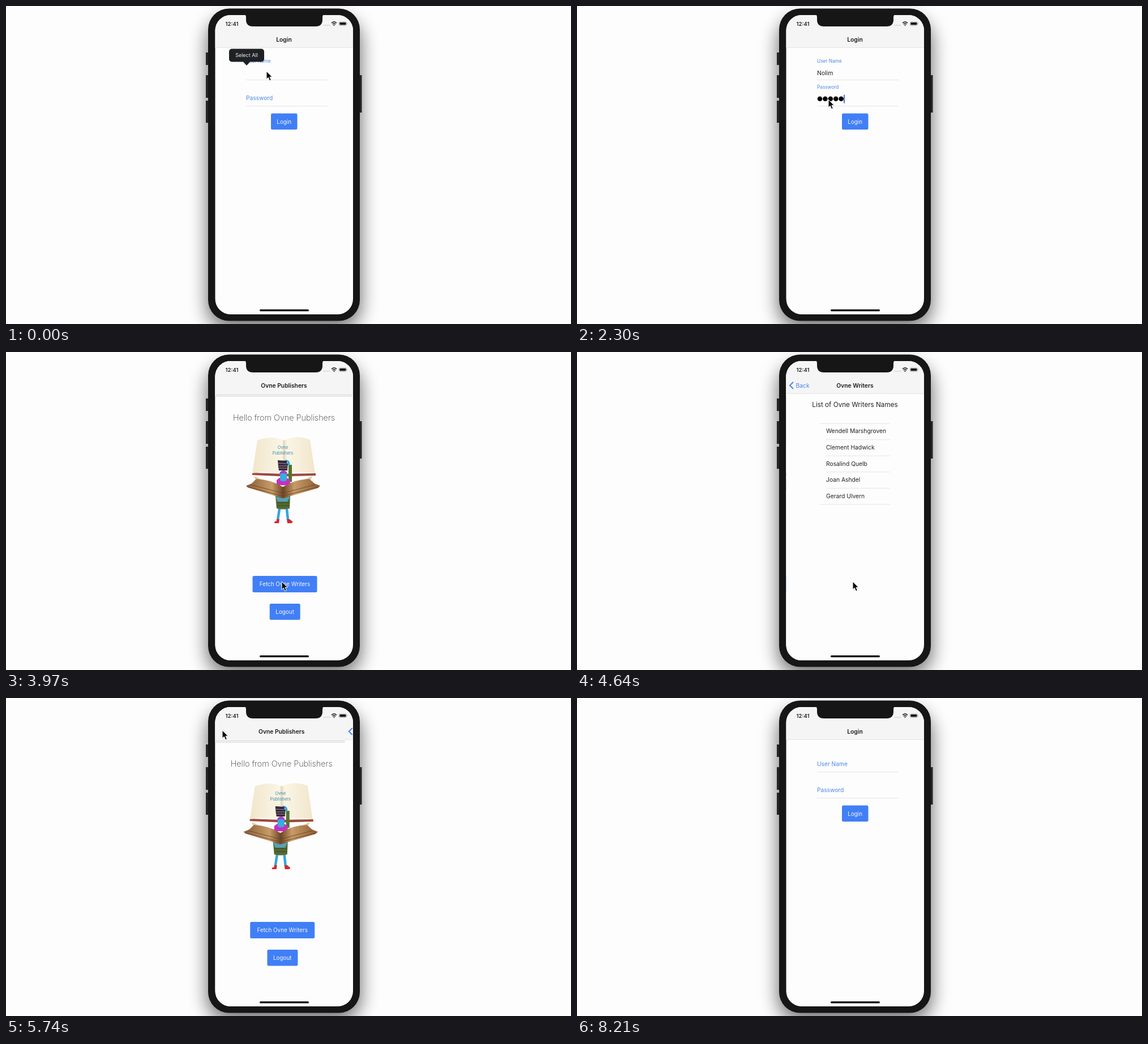
These frames come from a looping animation (998x561 px, 8.25 s). An HTML page:

```html
<!DOCTYPE html>
<html lang="en">
<head>
<meta charset="utf-8">
<title>Login flow</title>
<style>
  html, body { margin: 0; width: 100%; height: 100%; overflow: hidden; background: #fdfdfd; }
  svg { display: block; width: 998px; height: 561px; }
  text { font: 10.2px Inter, "Liberation Sans", sans-serif; fill: #222; }
  .mid { text-anchor: middle; }
  .title { font-weight: 600; font-size: 10.3px; text-anchor: middle; fill: #1c1c1e; }
  .blue { fill: #4a87ea; }
  .btn rect { fill: #417ff6; }
  .btn text { fill: #f4f8ff; font-size: 9.9px; text-anchor: middle; }
  .rule { stroke: #dedede; stroke-width: .8; fill: none; }
  .hello { font-weight: 200; font-size: 14.4px; fill: #333; }
  .cover { font-size: 7.4px; fill: #3f8cae; }
</style>
</head>
<body>
<svg viewBox="0 0 998 561">
  <defs>
    <clipPath id="screen"><rect x="369.5" y="16" width="243.5" height="528" rx="27"/></clipPath>
    <filter id="blur" x="-50%" y="-30%" width="200%" height="160%"><feGaussianBlur stdDeviation="16"/></filter>
    <linearGradient id="wood">
      <stop offset="0" stop-color="#8a5a33"/><stop offset=".35" stop-color="#c79c68"/>
      <stop offset=".5" stop-color="#6e4526"/><stop offset=".65" stop-color="#c79c68"/>
      <stop offset="1" stop-color="#8a5a33"/>
    </linearGradient>
    <linearGradient id="paper">
      <stop offset="0" stop-color="#f1e6cb"/><stop offset=".48" stop-color="#faf5e6"/>
      <stop offset=".5" stop-color="#e2d6b8"/><stop offset=".55" stop-color="#faf5e6"/>
      <stop offset="1" stop-color="#f1e6cb"/>
    </linearGradient>
  </defs>

  <rect x="355" y="22" width="272" height="548" rx="40" opacity=".55" filter="url(#blur)"/>
  <path fill="#252525" d="M353 82h5v22h-5zM353 122h5v40h-5zM353 167h5v39h-5zM624 122h4.5v66H624z"/>
  <rect x="357" y="4.5" width="268" height="551" rx="37" fill="#161616"/>

  <g clip-path="url(#screen)">
    <g id="login">
      <rect x="369" y="16" width="245" height="529" fill="#fdfdfd"/>
      <rect id="bar" x="369" y="16" width="245" height="57" fill="#f5f5f6"/>
      <path id="barLine" class="rule" d="M369 73.4H614"/>
      <text id="loginTitle" class="title" x="491" y="62.7">Login</text>
      <path class="rule" d="M424 130.4H568M424 176.6H568"/>
      <text id="userLabel" class="blue">User Name</text>
      <text id="passLabel" class="blue">Password</text>
      <text id="userText" x="424" y="121.6" style="font-size:10.5px"></text>
      <g id="dots"></g>
      <rect id="caret" width="1.8" height="15" fill="#4560c9"/>
      <g class="btn"><rect x="468" y="189.5" width="46.5" height="28.5" rx="2.5"/><text x="491.2" y="207.6">Login</text></g>
      <g id="tip">
        <path fill="#1f2124" d="M399 75.5h52a5 5 0 0 1 5 5v13a5 5 0 0 1-5 5h-20l-6 6.5-6-6.5h-20a5 5 0 0 1-5-5v-13a5 5 0 0 1 5-5z"/>
        <text class="mid" x="425" y="90.2" style="font-size:9px;fill:#f2f2f2">Select All</text>
      </g>
    </g>

    <g id="home">
      <rect x="369" y="16" width="245" height="529" fill="#fdfdfd"/>
      <rect x="369" y="16" width="245" height="62" fill="#f5f5f6"/>
      <path class="rule" style="stroke:#cfcfd1" d="M371 75.6H611M371 78.2H611"/>
      <text class="title" x="491" y="62.7">Ovne Publishers</text>
      <text class="mid hello" x="491" y="121">Hello from Ovne Publishers</text>
      <g id="art">
        <path fill="#9c4a3c" d="M435 213l56 2 56-1v4l-56 1.500-56-2.500z"/>
        <path fill="url(#paper)" d="M444 156Q470 146 491 156Q514 145 537 155L546 214Q515 208 491 215Q462 208 435 214z"/>
        <text class="mid cover" x="489" y="170.6">Ovne</text>
        <text class="mid cover" x="489" y="180.6">Publishers</text>
        <path fill="#50752f" d="M499 199h6v30h-6z"/>
        <path fill="none" stroke="#31a8dd" stroke-width="3.500" d="M493 192q7-1 7 8"/>
        <path fill="#35283a" d="M480 191l16 1v4l2 1-1 12h-15l-1-7z"/>
        <path stroke="#b9a6ad" stroke-width=".8" d="M481 196l15 1M482 201h15M482 205h15"/>
        <path fill="#dfc89d" d="M438 219l25 11-20-1zM541 219l-25 11 20-1z"/>
        <circle cx="490" cy="216" r="7" fill="#a63fc2"/>
        <path fill="#c72fbe" d="M478 226l5-4h13l6 4v9h-24z"/>
        <rect x="484" y="214" width="12" height="14" rx="4" fill="#34aede"/>
        <path fill="#546a34" d="M476 254h26l-1 22q-12 3-23 0z"/>
        <path fill="#55a1b5" d="M476 255l13 3 13-3-5 9h-17z"/>
        <path stroke="#36461f" d="M478 266h23M478 271h23"/>
        <path fill="url(#wood)" d="M424 236l10-4 8-8q26 1 47 14 20-13 47-14l9 8 10 4-4 4-62 18-62-19z"/>
        <path fill="none" stroke="#654126" stroke-width=".8" d="M427 238l62 16 62-16M432 234l57 15 57-15"/>
        <path stroke="#32a6dc" stroke-width="4.500" d="M483 277l-3 19M496 277l2 19"/>
        <path fill="#d5262f" d="M478 295h5l-1 7h-8q-1-3 4-4zM496 295h5l5 4q1 3-3 3h-6z"/>
      </g>
      <g class="btn"><rect x="435.500" y="395" width="114" height="29" rx="2.5"/><text x="492.500" y="413.200">Fetch Ovne Writers</text></g>
      <g class="btn"><rect x="465.700" y="444" width="54" height="28.500" rx="2.5"/><text x="492.600" y="462">Logout</text></g>
    </g>

    <g id="list">
      <rect x="369" y="16" width="245" height="529" fill="#fdfdfd"/>
      <rect x="369" y="16" width="245" height="57" fill="#f5f5f6"/>
      <path class="rule" d="M369 73.400H614"/>
      <path fill="none" stroke="#4a87ea" stroke-width="2" d="M382 53l-6 6 6 6"/>
      <text class="blue" x="386.500" y="62.700" style="font-size:10.300px">Back</text>
      <text class="title" x="491" y="62.700">Ovne Writers</text>
      <text class="mid" x="491" y="96.600" style="font-size:11.700px">List of Ovne Writers Names</text>
      <g id="rows"></g>
    </g>

    <text x="387.500" y="34.500" style="font-size:9.500px;font-weight:600">12:41</text>
    <path stroke="#bbb" stroke-width="1.500" stroke-dasharray="1.500 1.600" d="M561 34h11"/>
    <g fill="none" stroke="#111" stroke-width="1.400">
      <path d="M575 30q4.500-4 9 0M576.800 32.200q2.700-2.400 5.400 0"/>
      <circle cx="579.500" cy="34" r=".4"/>
    </g>
    <rect x="588.400" y="27.900" width="13" height="6.400" rx="1.800" fill="none" stroke="#888" stroke-width=".7"/>
    <rect x="589.400" y="28.900" width="11" height="4.400" rx="1" fill="#111"/>
    <path fill="#777" d="M602.200 30q1.600 1.100 0 2.200z"/>
    <rect x="448" y="535.300" width="87" height="3.200" rx="1.600" fill="#0a0a0a"/>
  </g>
  <path fill="#161616" d="M420 15q4 0 4 5v4q0 12 12 12h111q12 0 12-12v-4q0-5 4-5z"/>
  <path id="cursor" fill="#0b0b0b" stroke="#fff" stroke-width="1" d="M0 0V14.200L3.300 11.200L5.600 16.800L8.300 15.600L6 10.200H10.300z"/>
</svg>
<script>
const LOOP = 8250, WIDTH = 244, SLIDE = 500;
const USER = "Nolim";
const WRITERS = ["Wendell Marshgroven", "Clement Hadwick", "Rosalind Quelb", "Joan Ashdel", "Gerard Ulvern"];
// time, x, y of the pointer
const PATH = [[0, 460, 115], [850, 460, 115], [1130, 444, 165], [2500, 444, 165], [3000, 491, 201],
  [3480, 491, 201], [3950, 487, 405], [4750, 487, 405], [5200, 382, 57], [5850, 382, 57], [6300, 490, 455]];

const $ = id => document.getElementById(id);
const clamp = v => Math.max(0, Math.min(1, v));
const easeOut = v => 1 - (1 - clamp(v)) ** 3;
const smooth = v => v * v * (3 - 2 * v);
const set = (id, name, value) => $(id).setAttribute(name, value);
const show = (id, on) => set(id, "visibility", on ? "visible" : "hidden");
const move = (id, x, y = 0) => set(id, "transform", `translate(${x} ${y})`);

$("rows").innerHTML = WRITERS.map((name, i) =>
  `<text x="440" y="${143.3 + i * 28.6}" style="font-size:10.3px">${name}</text>`).join("") +
  [0, 1, 2, 3, 4, 5].map(i =>
    `<path class="rule" d="M${i % 5 ? 440 : 429} ${126.2 + i * 28.5}H552.5"/>`).join("");
$("dots").innerHTML = [0, 1, 2, 3, 4].map(i =>
  `<circle cx="${429 + i * 9.4}" cy="163.8" r="4.3"/>`).join("");

// 0 when a page is off screen, 1 when it is fully in
function slide(t, enter, leave) {
  return t < leave ? easeOut((t - enter) / SLIDE) : 1 - easeOut((t - leave) / SLIDE);
}

function floatLabel(id, y, k) {
  set(id, "transform", `translate(424 ${y - 20 * k}) scale(${1 - 0.19 * k})`);
}

function pointer(t) {
  const i = PATH.findIndex(p => p[0] > t);
  if (i < 0) return PATH[PATH.length - 1].slice(1);
  const [t0, x0, y0] = PATH[i - 1], [t1, x1, y1] = PATH[i];
  const k = smooth((t - t0) / (t1 - t0));
  return [x0 + (x1 - x0) * k, y0 + (y1 - y0) * k];
}

function drawPages(t) {
  const home = slide(t, 3370, 6810), list = slide(t, 4120, 5435);
  move("login", -0.3 * WIDTH * home);
  move("home", WIDTH * (1 - home) - 0.3 * WIDTH * list);
  move("list", WIDTH * (1 - list));
  const leaving = t >= 3300 && t < 6810;
  set("loginTitle", "opacity", leaving ? 0 : 1 - home);
  set("bar", "height", leaving ? 60 : 57);
  move("barLine", 0, leaving ? 2.8 : 0);
}

function drawForm(t) {
  const filled = t < 6800;
  const chars = filled ? Math.max(0, Math.min(5, Math.floor((t - 400) / 85))) : 0;
  const dots = filled ? Math.max(0, Math.min(5, Math.floor((t - 1500) / 150))) : 0;
  floatLabel("userLabel", 119.8, filled ? 1 : 0);
  floatLabel("passLabel", 165.8, filled ? clamp((t - 1130) / 120) : 0);
  $("userText").textContent = USER.slice(0, chars);
  [...$("dots").children].forEach((d, i) => d.setAttribute("opacity", i < dots ? 1 : 0));
  show("tip", t < 400);
  const inUser = t < 1150;
  move("caret", inUser ? 424.5 + (chars ? $("userText").getComputedTextLength() : 0) : 424 + dots * 9.4, inUser ? 110 : 156.500);
  show("caret", t > 400 && t < 3100 && (inUser || (t - 1150) % 1000 < 600));
}

function frame(now) {
  const t = now % LOOP;
  drawPages(t);
  drawForm(t);
  move("cursor", ...pointer(t));
  show("cursor", t < 6700);
  requestAnimationFrame(frame);
}
frame(performance.now());
</script>
</body>
</html>
```
